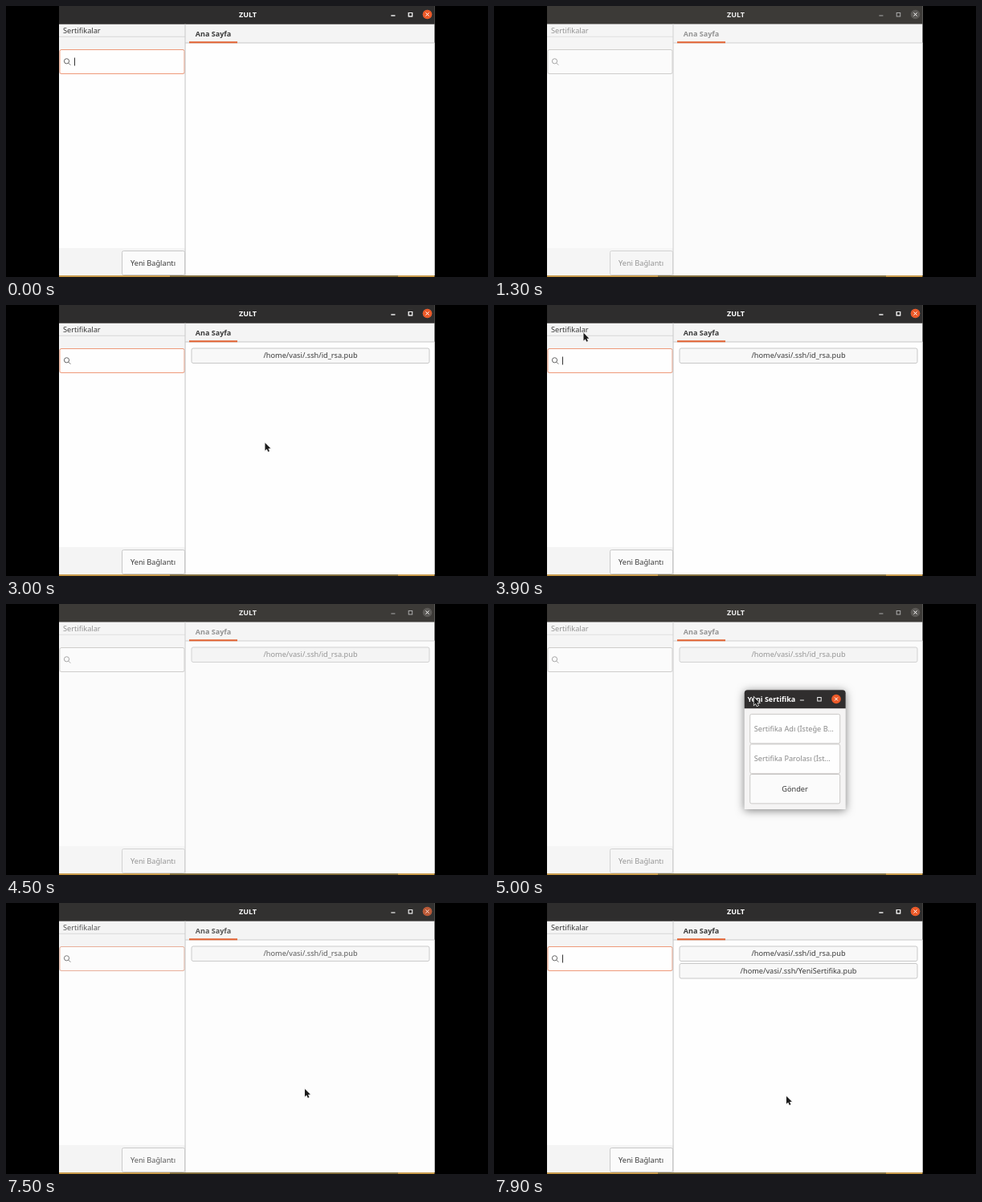
Animation of 600x338 px, one loop 8000 ms. Source, as an HTML page with a canvas:

```html
<!DOCTYPE html>
<html lang="tr">
<head>
<meta charset="utf-8">
<style>
html, body { margin: 0; width: 100%; height: 100%; overflow: hidden; background: #000; }
canvas { display: block; }
</style>
</head>
<body>
<canvas id="stage" width="600" height="338"></canvas>
<script>
const LOOP = 8000, STEP = 100;
const ORANGE = '#ec5a29', FIELD_EDGE = '#cbc9c7', FOCUS_EDGE = '#ee9a7a';
const NEW_NAME = 'YeniSertifika';
const ctx = document.getElementById('stage').getContext('2d');

// 0 before start, 1 after end
const ramp = (t, start, end) => Math.min(1, Math.max(0, (t - start) / (end - start)));
const ease = k => k * k * (3 - 2 * k);
const lerp = (a, b, k) => a + (b - a) * k;
const gray = (focused, dimmed, dim) => {
  const v = Math.round(lerp(focused, dimmed, dim));
  return `rgb(${v},${v},${v})`;
};

function rect(x, y, w, h, color) {
  ctx.fillStyle = color;
  ctx.fillRect(x, y, w, h);
}

function box(x, y, w, h, fill, stroke) {
  ctx.beginPath();
  ctx.roundRect(x + .5, y + .5, w - 1, h - 1, 2);
  ctx.fillStyle = fill;
  ctx.fill();
  ctx.strokeStyle = stroke;
  ctx.lineWidth = 1;
  ctx.stroke();
}

function text(str, x, y, color, { bold = false, align = 'left' } = {}) {
  ctx.font = `${bold ? 'bold 9px' : '9.2px'} "Noto Sans", sans-serif`;
  ctx.textAlign = align;
  ctx.fillStyle = color;
  ctx.fillText(str, x, y);
}

function line(color, x1, y1, x2, y2) {
  ctx.beginPath();
  ctx.moveTo(x1, y1);
  ctx.lineTo(x2, y2);
  ctx.strokeStyle = color;
  ctx.lineWidth = 1;
  ctx.stroke();
}

function disc(x, y, r, color) {
  ctx.beginPath();
  ctx.arc(x, y, r, 0, 7);
  ctx.fillStyle = color;
  ctx.fill();
}

// Draws over a dimmed look with the focused look at partial opacity
function blend(dim, paint) {
  ctx.globalAlpha = 1 - dim;
  paint();
  ctx.globalAlpha = 1;
}

function windowButtons(closeX, y, color, fill) {
  const gap = 21.3;
  line(color, closeX - 2 * gap - 2.5, y + 1.5, closeX - 2 * gap + 2.5, y + 1.5);
  ctx.strokeRect(closeX - gap - 2, y - 2, 4.5, 4.5);
  disc(closeX, y, 5.8, fill);
  line('#fff', closeX - 2, y - 2, closeX + 2, y + 2);
  line('#fff', closeX + 2, y - 2, closeX - 2, y + 2);
}

// dim: 0 = focused, 1 = in the background
function mainWindow(dim, rows, caret) {
  const ink = gray(58, 148, dim), paper = gray(254, 251, dim);
  const edge = gray(200, 210, dim), icon = gray(100, 165, dim);

  rect(66, 0, 467.5, 336, gray(244, 245, dim));
  rect(66, 0, 467.5, 22.5, '#3c3a37');
  blend(dim, () => rect(66, 0, 467.5, 22.5, '#2e2d2d'));
  text('ZULT', 301, 14, gray(255, 238, dim), { bold: true, align: 'center' });
  windowButtons(524.5, 10.5, gray(235, 170, dim), '#5c5a57');
  blend(dim, () => windowButtons(524.5, 10.5, '#ebebeb', ORANGE));

  // Sidebar
  text('Sertifikalar', 71, 34, ink);
  rect(66, 37.8, 157, 1, gray(215, 224, dim));
  rect(66, 85, 157, 217, paper);
  box(66.5, 54, 156, 31, paper, '#cfcdcb');
  blend(dim, () => box(66.5, 54, 156, 31, paper, FOCUS_EDGE));
  ctx.beginPath();
  ctx.arc(75.5, 68.8, 3.1, 0, 7);
  ctx.strokeStyle = icon;
  ctx.stroke();
  line(icon, 77.8, 71.2, 80.3, 73.7);
  if (caret) rect(85, 64.5, 1, 10, '#333');
  box(144, 305, 79, 31, gray(251, 246, dim), edge);
  text('Yeni Bağlantı', 183, 324, ink, { align: 'center' });

  // Tab and page
  rect(224, 46, 309.5, 290, paper);
  rect(223, 45.5, 310.5, 1, edge);
  rect(222.5, 22.5, 1, 313.5, edge);
  rect(228, 44.3, 60, 2, '#e2602f');
  text('Ana Sayfa', 258, 38, ink, { bold: true, align: 'center' });
  rows.forEach((name, i) => {
    const y = 53.5 + i * 21.5;
    box(230.5, y, 297, 19.5, gray(248, 244, dim), edge);
    text(`/home/vasi/.ssh/${name}.pub`, 379, y + 12.8, ink, { align: 'center' });
  });

  // Desktop showing below the window
  rect(66, 336, 467.5, 2, '#c79a4b');
  rect(204, 336, 284, 2, '#84703f');
}

function dialog(x, y, alpha, { typed = '', focused = false, pressed = false }) {
  const width = 126, height = 148.7, scale = lerp(.9, 1, alpha);
  ctx.save();
  ctx.translate(x + width / 2, y + height / 2);
  ctx.scale(scale, scale);
  ctx.translate(-width / 2, -height / 2);
  ctx.globalAlpha = alpha;

  const panel = (h, color) => {
    ctx.beginPath();
    ctx.roundRect(0, 0, width, h, [4, 4, 0, 0]);
    ctx.fillStyle = color;
    ctx.fill();
  };
  ctx.shadowColor = 'rgba(0,0,0,.5)';
  ctx.shadowBlur = 11;
  ctx.shadowOffsetY = 1.5;
  panel(height, '#f5f4f4');
  ctx.shadowColor = 'transparent';
  panel(23, '#302e2e');
  text('Yeni Sertifika', 3.7, 14.5, '#fff', { bold: true });
  windowButtons(114.3, 11.3, '#eee', ORANGE);

  const fills = ['#fefefe', '#fefefe', pressed ? '#dfdddb' : '#fbfbfb'];
  fills.forEach((fill, i) =>
    box(6.5, 29.7 + i * 37.5, 113, 37.5, fill, focused && i === 0 ? FOCUS_EDGE : FIELD_EDGE));
  text(typed || 'Sertifika Adı (İsteğe B…', 12, 51.5, typed ? '#222' : '#8a8a8a');
  if (focused) rect(12.3 + (typed && ctx.measureText(typed).width), 43, .9, 10, '#333');
  text('Sertifika Parolası (İst…', 12, 89, '#8a8a8a');
  text('Gönder', 62.8, 126.3, '#3a3a3a', { align: 'center' });
  ctx.restore();
}

function pointer(x, y) {
  ctx.save();
  ctx.translate(x, y);
  const arrow = new Path2D('M0 0V9.6L2.2 7.6 3.8 11 5.4 10.2 3.9 7 6.8 6.8Z');
  ctx.strokeStyle = '#eee';
  ctx.lineWidth = 1.4;
  ctx.stroke(arrow);
  ctx.fillStyle = '#1b1b1b';
  ctx.fill(arrow);
  ctx.restore();
}

const menu = [104, 30], send = [380.5, 206.5], rest = [322.5, 172];
const field = [375, 155], sendAgain = [372, 232], finish = [364, 241];
const MOVES = [
  { start: 200, end: 1000, from: [300, 170], to: menu, hide: 1300 },
  { start: 1400, end: 2000, from: menu, to: send, hide: 2400 },
  { start: 2400, end: 2700, from: send, to: rest, hide: 3100 },
  { start: 3100, end: 4000, from: rest, to: menu, hide: 4500 },
  { start: 4700, end: 5200, from: [229, 45], to: field, hide: 5500 },
  { start: 7000, end: 7200, from: field, to: sendAgain, hide: 7700 },
  { start: 7700, end: 7900, from: sendAgain, to: finish, hide: LOOP },
];

function draw(t) {
  const pulse = (inStart, inEnd, outStart, outEnd) =>
    ramp(t, inStart, inEnd) - ramp(t, outStart, outEnd);
  const dim = pulse(500, 900, 2400, 2700) + pulse(4000, 4400, 7300, 7600);
  const first = pulse(1400, 1600, 2400, 2600);
  const second = pulse(4600, 4800, 7300, 7500);
  const letters = Math.round(5 * ramp(t, 5400, 5800) + 8 * ramp(t, 5900, 6500));
  const rows = [];
  if (t >= 3000) rows.push('id_rsa');
  if (t >= 7700) rows.push(NEW_NAME);

  rect(0, 0, 600, 338, '#000');
  mainWindow(dim, rows, dim === 0 && t % 1100 < 750);
  if (first > 0) dialog(313.5, 78.3, first, { pressed: t === 2200 });
  if (second > 0) dialog(311.7, 107.2, second, {
    typed: NEW_NAME.slice(0, letters),
    focused: t >= 5200 && t < 7200,
    pressed: t === 7200,
  });

  const move = MOVES.find(m => t >= m.start && t < m.hide);
  if (move) {
    const k = ease(ramp(t, move.start, move.end));
    pointer(...move.from.map((v, i) => lerp(v, move.to[i], k)));
  }
}

function frame(now) {
  draw(Math.floor(now % LOOP / STEP) * STEP);
  requestAnimationFrame(frame);
}
frame(performance.now());
</script>
</body>
</html>
```
